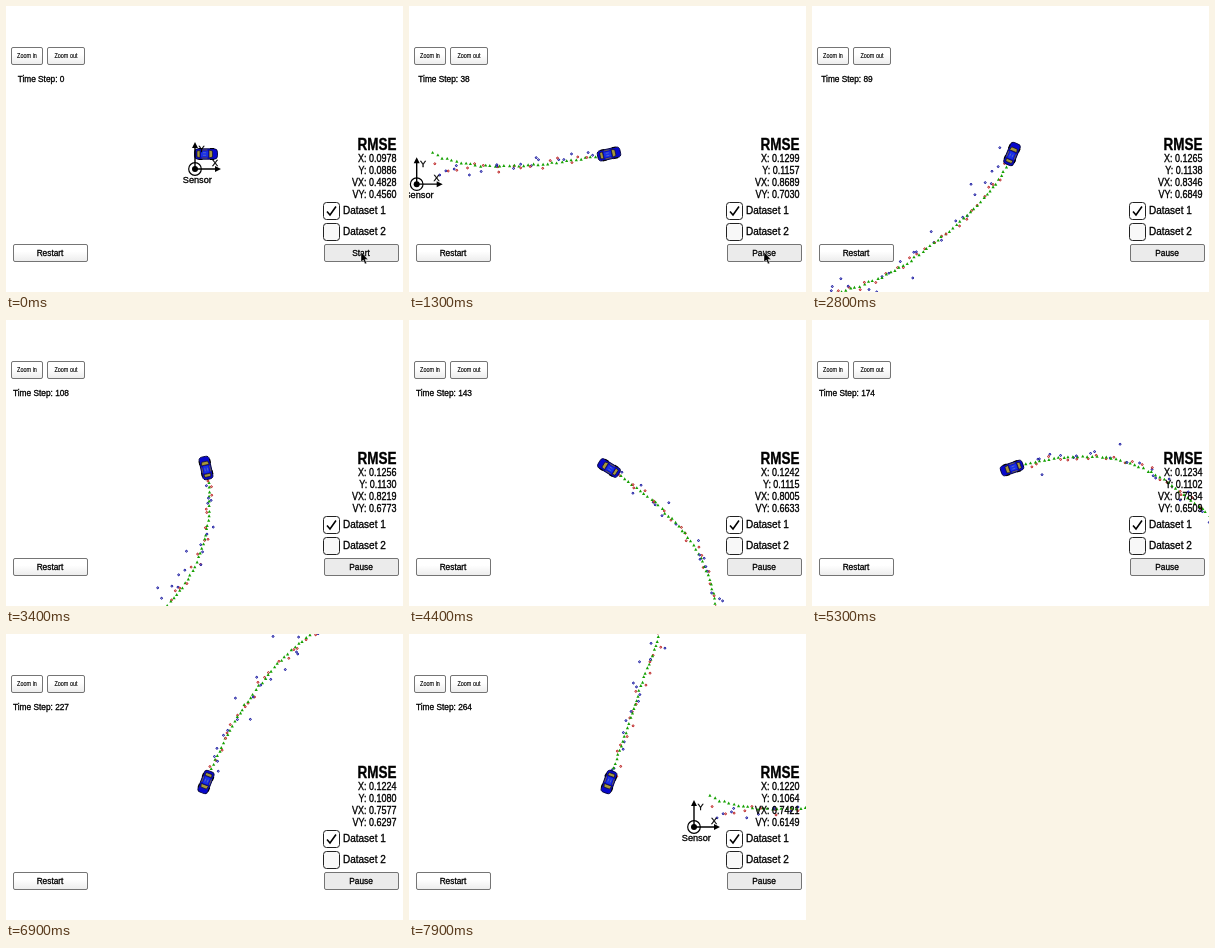
Recreate the animation shown at these times as an HTML page. Size 397 px wide and 286 px high, loop 8000 ms.

```html
<!DOCTYPE html>
<html lang="en">
<head>
<meta charset="utf-8">
<title>Sensor fusion tracking</title>
<style>
  html, body { margin: 0; width: 100%; height: 100%; overflow: hidden; background: #fff; }
  svg { display: block; width: 397px; height: 286px; font-family: "Liberation Sans", Arial, sans-serif; }
  .button { fill: url(#face); stroke: #666; stroke-width: .9; }
  .pressed { fill: #ebebeb; }
  .label { fill: #000; stroke: #000; stroke-width: .3; }
  .middle { text-anchor: middle; }
  .end { text-anchor: end; }
</style>
</head>
<body>
<svg viewBox="0 0 397 286">
  <defs>
    <linearGradient id="face" x2="0" y2="1">
      <stop offset=".4" stop-color="#fff"/>
      <stop offset="1" stop-color="#ececec"/>
    </linearGradient>
    <path id="route" d="M11-15C74-15 139-18 196-31S277-60 316-93C378-142 400-190 390-257
      C379-318 329-357 288-385S194-408 149-397C69-374 7-298-24-219S-67-95-85-45"/>
  </defs>
  <rect width="397" height="286" fill="#fff"/>
  <g id="trail"></g>
  <g id="car">
    <rect x="-11.5" y="-5.2" width="23" height="10.4" rx="3.4" fill="#0808cc" stroke="#04043c" stroke-width=".9"/>
    <path d="M-7.5-5.5h4M4-5.5h4M-7.5 5.5h4M4 5.5h4" stroke="#000" stroke-width="1"/>
    <path d="M3-3.9 6.5-3V3L3 3.9ZM-9-3-6-3.5V3.5L-9 3Z" fill="#a8983a" stroke="#101030" stroke-width=".7"/>
    <path d="M-4.5-4H1.5M-4.5 4H1.5" stroke="#77703c" stroke-width=".8"/>
    <rect x="-5" y="-2.7" width="7" height="5.4" fill="#1830e8"/>
    <path d="M-3-1.3H0M-3 1.3H0" stroke="#6a76b8" stroke-width=".7"/>
  </g>
  <g id="sensor">
    <path d="M0 0V-22M0 0H21" stroke="#000" stroke-width="1.4"/>
    <path d="M0-27 3-21H-3ZM26 0 20-3V3Z"/>
    <circle r="6.3" fill="none" stroke="#000" stroke-width="1.2"/>
    <circle r="3"/>
    <g class="label middle" font-size="9.2">
      <text x="6.5" y="-17">Y</text>
      <text x="20" y="-3">X</text>
      <text x="2.3" y="14">Sensor</text>
    </g>
  </g>
  <rect class="button" x="5.5" y="41.5" width="31" height="17" rx="1.5"/>
  <rect class="button" x="41.5" y="41.5" width="37" height="17" rx="1.5"/>
  <rect class="button" x="7.5" y="238.5" width="74" height="17" rx="1.5"/>
  <rect class="button pressed" x="318.5" y="238.5" width="74" height="17" rx="1.5"/>
  <g class="label middle">
    <g font-size="5.5" stroke-width=".1" transform="scale(1 1.3)">
      <text x="21" y="40.3">Zoom in</text>
      <text x="60" y="40.3">Zoom out</text>
    </g>
    <g font-size="8.3">
      <text x="35" y="76" id="counter"></text>
      <text x="44" y="250">Restart</text>
      <text x="355" y="250" id="toggle"></text>
    </g>
  </g>
  <g fill="#fff" stroke="#222">
    <rect x="317.5" y="196.5" width="16" height="17" rx="3"/>
    <rect x="317.5" y="217.5" width="16" height="17" rx="3" fill="#f8f8f8"/>
    <path d="M321 205.5 324 209 330 200.5" fill="none" stroke="#000" stroke-width="1.6"/>
  </g>
  <g class="label" font-size="10">
    <text x="337" y="208">Dataset 1</text>
    <text x="337" y="229">Dataset 2</text>
  </g>
  <g class="label end" id="errors" transform="scale(1 1.22)" font-size="9">
    <text x="390.5" y="118.2" font-size="13.5" font-weight="bold">RMSE</text>
  </g>
  <path id="cursor" d="M355 246V256L357.3 254 359 258 360.6 257.2 359 253.4H362Z" stroke="#fff" stroke-width=".4"/>
</svg>
<script>
const LOOP = 8000, TICK = 100, LAST_STEP = 264;
const CENTER = { x: 200, y: 148 };
const $ = id => document.getElementById(id);
const route = $("route"), stride = route.getTotalLength() / LAST_STEP;

// The counter runs at an uneven pace between a few moments: [time, step]
const pace = [[100, 1], [1300, 38], [2100, 67], [3400, 108], [5300, 174], [6900, 227], [7900, LAST_STEP]];

function stepAt(time) {
  if (time < TICK) return 0;
  const i = pace.findIndex(([end]) => time <= end) || 1;
  const [t0, s0] = pace[i - 1], [t1, s1] = pace[i];
  return Math.round(s0 + (s1 - s0) * (time - t0) / (t1 - t0));
}

// Each error climbs quickly from its first value, then settles slowly
const errors = [
  { name: "X", first: .0978, later: s => .121 + .0135 * Math.exp(-s / 100) },
  { name: "Y", first: .0886, later: s => .1175 - .000042 * s },
  { name: "VX", first: .4828, later: s => .615 + .29 * Math.exp(-s / 320) },
  { name: "VY", first: .4560, later: s => .7205 - .0004 * s }
];
const errorAt = ({ first, later }, step) => later(step) + (first - later(0)) * Math.exp(-step / 8);

const positionAt = step => route.getPointAtLength(step * stride);

function headingAt(step) {
  const a = positionAt(Math.max(step - .5, 0)), b = positionAt(step + .5);
  return Math.atan2(b.y - a.y, b.x - a.x) * 180 / Math.PI;
}

let seed = 41;
const random = () => (seed = seed * 16807 % 2147483647) / 2147483647;
const noise = () => (random() + random() + random() + random() - 2) * 1.7;

function add(parent, name, attributes = {}) {
  const node = document.createElementNS("http://www.w3.org/2000/svg", name);
  for (const key in attributes) node.setAttribute(key, attributes[key]);
  return parent.appendChild(node);
}

// Lidar (red) and radar (blue) alternate; green is the filtered estimate
function addMarkers(step) {
  const group = add($("trail"), "g");
  const { x, y } = positionAt(step), range = Math.hypot(x, y), radar = step % 2;
  const along = noise() * (radar ? 4 : 2.4), across = noise() * (radar ? 3 + range * .02 : 2.4);
  add(group, "circle", {
    cx: x + (x * along - y * across) / range,
    cy: y + (y * along + x * across) / range,
    r: .9, fill: "#fff", "stroke-width": 1, stroke: radar ? "#000098" : "#b81010"
  });
  const ex = x + noise() * .4, ey = y + noise() * .5 - 19 * Math.exp(-step / 6);
  add(group, "path", { d: `M${ex} ${ey - 1.6}l1.6 2.9h-3.2z`, fill: "#14a000" });
  return group;
}
const markers = Array.from({ length: LAST_STEP }, (_, i) => addMarkers(i + 1));
const errorLines = errors.map((_, i) => add($("errors"), "text", { x: 390.5, y: 128.2 + i * 9.7 }));

function render(time) {
  const step = stepAt(Math.floor(time / TICK) * TICK), car = positionAt(step);
  const shift = `translate(${CENTER.x - car.x} ${CENTER.y - car.y})`;
  $("trail").setAttribute("transform", shift);
  $("sensor").setAttribute("transform", shift);
  $("car").setAttribute("transform", `translate(${CENTER.x} ${CENTER.y}) rotate(${headingAt(step)})`);
  markers.forEach((node, i) => { node.style.display = i < step ? "" : "none"; });
  $("counter").textContent = `Time Step: ${step}`;
  $("toggle").textContent = step ? "Pause" : "Start";
  $("cursor").style.display = time < 2700 ? "" : "none";
  errorLines.forEach((line, i) => {
    line.textContent = `${errors[i].name}: ${errorAt(errors[i], step).toFixed(4)}`;
  });
}

const start = performance.now();
function frame() {
  render((performance.now() - start) % LOOP);
  requestAnimationFrame(frame);
}
frame();
</script>
</body>
</html>
```
